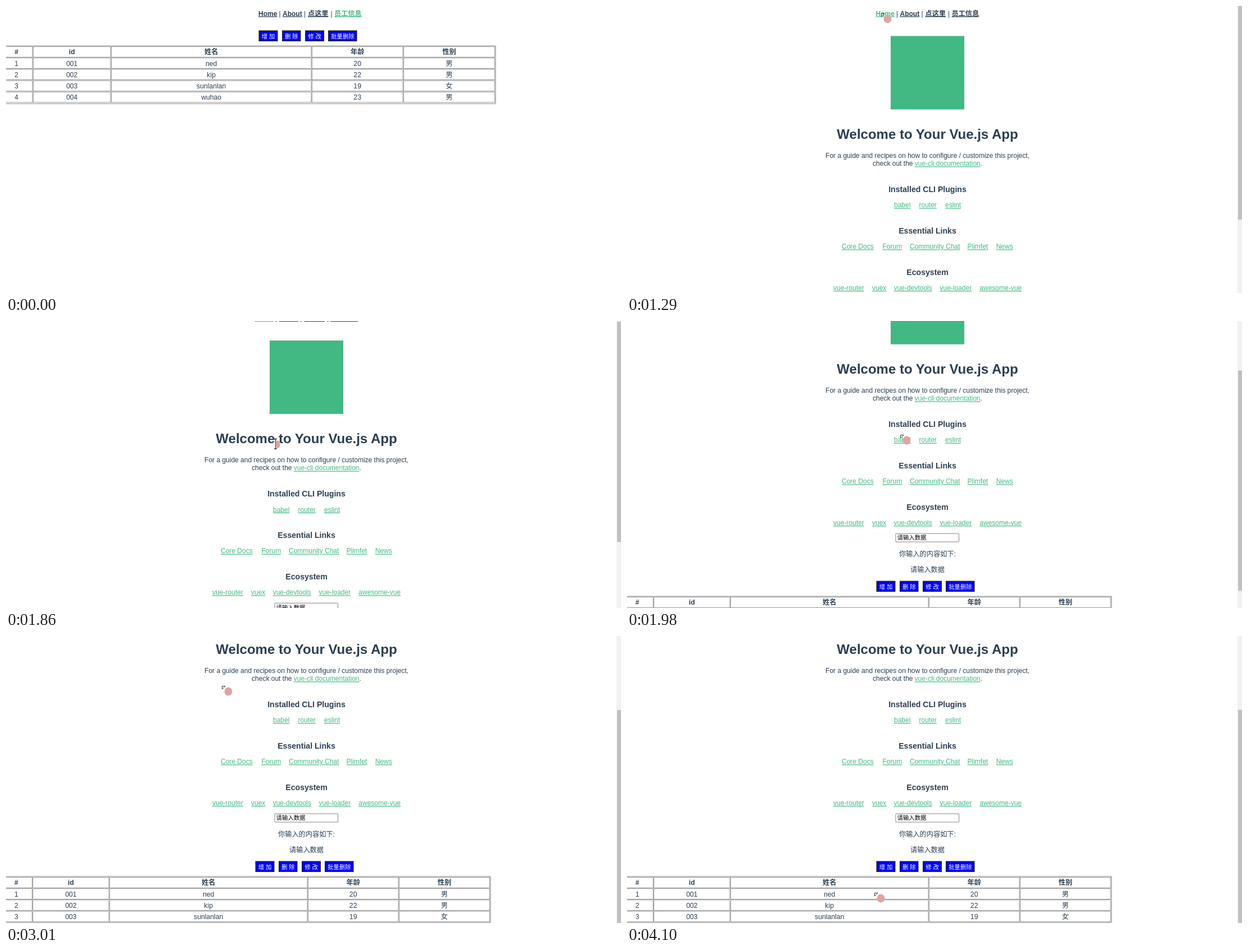
Write an HTML page that moves like this. It is 1094 px wide and 512 px high and loops after 4.17 s.

```html
<!DOCTYPE html>
<html lang="zh-CN">
<head>
<meta charset="utf-8">
<title>员工信息</title>
<style>
  html, body { margin: 0; width: 100%; height: 100%; overflow: hidden; background: #fff; }
  svg { display: block; width: 1094px; height: 512px; }
  text { font: 12px "Liberation Sans", "Noto Sans CJK SC", "Noto Sans CJK", sans-serif; fill: #2c3e50; white-space: pre; }
  .mid { text-anchor: middle; }
  .bold { font-weight: bold; }
  .link { text-decoration: underline; }
  .green { fill: #42b983; }
  .cjk { font-size: 12.2px; }
  .small { font-size: 10.4px; }
  .white { fill: #fff; }
  .black { fill: #000; }
  .h1 { font-size: 24px; }
  .h3 { font-size: 14.1px; }
  .cell { fill: none; stroke: #777; stroke-width: .8; }
</style>
</head>
<body>
<svg viewBox="0 0 1094 512">
  <g id="staff"></g>
  <g id="home"></g>
  <g id="bar">
    <rect x="1086" width="8" height="512" fill="#f1f1f1"/>
    <rect id="thumb" x="1087" width="7" height="393" fill="#c1c1c1"/>
  </g>
  <g id="cursor">
    <path id="arrow" d="M.5 .5H6L.5 6Z" fill="#fff" stroke="#222" stroke-width=".9"/>
    <path id="beam" d="M0 .5H5M2.5 .5V18M0 18H5" fill="none" stroke="#333" stroke-width="1.3"/>
    <ellipse id="pet" fill="#dda5a3"/>
  </g>
</svg>
<script>
const $ = id => document.getElementById(id);
const text = (x, y, s, cls = '') => `<text x="${x}" y="${y}" class="${cls}">${s}</text>`;
const rect = (x, y, w, h, attrs) => `<rect x="${x}" y="${y}" width="${w}" height="${h}" ${attrs}/>`;

function nav(dx, active) {
  const items = [[449, 'Home'], [492, 'About'], [537, '点这里'], [584, '员工信息']];
  return items.map(([x, s], i) =>
    text(x + dx, 17.5, s, `bold link ${i > 1 ? 'cjk' : ''} ${s === active ? 'green' : ''}`)).join('') +
    [485.5, 530, 577.5].map(x => text(x + dx, 17.5, '|')).join('');
}

function buttons(dx, dy) {
  return [[449.5, 34, '增 加'], [491, 33.5, '删 除'], [532, 34, '修 改'], [573, 51.5, '批量删除']]
    .map(([x, w, s]) =>
      rect(x + dx, 43.5 + dy, w, 19.5, 'fill="#222"') +
      rect(x + dx + 1.5, 45 + dy, w - 3, 16.5, 'fill="#00f"') +
      text(x + dx + w / 2, 57.5 + dy, s, 'mid small white')).join('');
}

// cols: right edge of each column's cells; the first column starts off stage
function table(cols, dy) {
  const rows = [
    ['#', 'id', '姓名', '年龄', '性别'],
    [1, '001', 'ned', 20, '男'],
    [2, '002', 'kip', 22, '男'],
    [3, '003', 'sunlanlan', 19, '女'],
    [4, '004', 'wuhao', 23, '男']
  ];
  const right = cols[4] + 1.5;
  let out = rect(-12, 70.9 + dy, right + 12, 103.4, 'class="cell"');
  rows.forEach((row, r) => row.forEach((s, c) => {
    const x = c ? cols[c - 1] + 1.3 : -10, y = 72.5 + 20.2 * r + dy;
    out += rect(x, y, cols[c] - x, 18.7, 'class="cell"') +
      text((x + cols[c]) / 2, y + 13.8, s, `mid ${r ? '' : 'bold'} ${c > 1 ? 'cjk' : ''}`);
  }));
  return out;
}

const links = (y, items) => items.map(([x, s]) => text(x, y, s, 'link green')).join('');
const cx = 534.5;

$('staff').innerHTML = nav(0, '员工信息') + buttons(0, 0) + table([47, 186, 543, 706, 869.5], 0);

$('home').innerHTML = nav(-6.5, 'Home') +
  rect(469, 53.5, 131, 131, 'fill="#42b883"') +
  text(cx, 237, 'Welcome to Your Vue.js App', 'mid bold h1') +
  text(cx, 270.7, 'For a guide and recipes on how to configure / customize this project,', 'mid') +
  text(cx, 285.2, 'check out the <tspan class="link green">vue-cli documentation</tspan>.', 'mid') +
  ['Installed CLI Plugins', 'Essential Links', 'Ecosystem']
    .map((s, i) => text(cx, 332 + 73.8 * i, s, 'mid bold h3')).join('') +
  links(359.4, [[475, 'babel'], [519.5, 'router'], [566, 'eslint']]) +
  links(433.2, [[382, 'Core Docs'], [454.5, 'Forum'], [503, 'Community Chat'], [605.5, 'Plimfet'], [656.7, 'News']]) +
  links(507, [[367, 'vue-router'], [436, 'vuex'], [474.7, 'vue-devtools'], [556.5, 'vue-loader'], [627.3, 'awesome-vue']]) +
  rect(478, 522, 112.5, 15, 'rx="1" fill="#fff" stroke="#767676" stroke-width=".9"') +
  text(480.5, 533.3, '请输入数据', 'small black') +
  text(cx, 562.5, '你输入的内容如下:', 'mid cjk') +
  text(cx, 591, '请输入数据', 'mid cjk') +
  buttons(-6, 563) + table([46.5, 183, 536, 698, 860.5], 563);

const LOOP = 4170, TICKS = 61;
const path = [
  [1, 1059, 487], [5, 448, 18], [6, 448, 18], [9, 720, 149], [12, 439, 14], [14, 439, 14],
  [19, 452, 13], [22, 455, 18], [27, 477, 209.5], [30, 490, 200], [32, 490, 200]
];
const spin = [[33, -75], [35, -10], [36, -10], [38, 70], [51, 470], [60, 811]];
const scroll = [[26, 0], [27, 18.7], [30, 205]];
const beamTicks = [26, 27, 51];

function at(keys, k, n = 1) {
  if (k <= keys[0][0]) return keys[0][n];
  const i = keys.findIndex(key => key[0] >= k);
  if (i < 0) return keys[keys.length - 1][n];
  const a = keys[i - 1], b = keys[i];
  return a[n] + (b[n] - a[n]) * (k - a[0]) / (b[0] - a[0]);
}

function cursorAt(k) {
  if (k < 33) return [at(path, k, 1), at(path, k, 2)];
  const a = at(spin, k) * Math.PI / 180, c = Math.cos(a), s = Math.sin(a);
  const late = k > 51;   // the last round is smaller at the left and bottom
  return [443 + c * (late && c < 0 ? 146 : 224), 287 + s * (late && s > 0 ? 171 : 205)];
}

const show = (id, on) => $(id).setAttribute('display', on ? 'inline' : 'none');
const set = (id, attrs) => { for (const n in attrs) $(id).setAttribute(n, attrs[n]); };

function draw(now) {
  const k = Math.floor((now % LOOP + 14) / LOOP * TICKS) % TICKS;
  const home = k >= 17, y = at(scroll, k), beam = beamTicks.includes(k);
  show('staff', !home);
  show('home', home);
  show('bar', home);
  show('cursor', k > 0);
  show('arrow', !beam);
  show('beam', beam);
  set('home', { transform: `translate(0 ${-y})` });
  set('thumb', { y: y * .702 - 12 });
  set('cursor', { transform: `translate(${cursorAt(k).map(Math.round)})` });
  set('pet', beam ? { cx: 6.5, cy: 10, rx: 4, ry: 7 } : { cx: 11.5, cy: 10, rx: 7, ry: 7.5 });
  requestAnimationFrame(draw);
}
requestAnimationFrame(draw);
</script>
</body>
</html>
```
